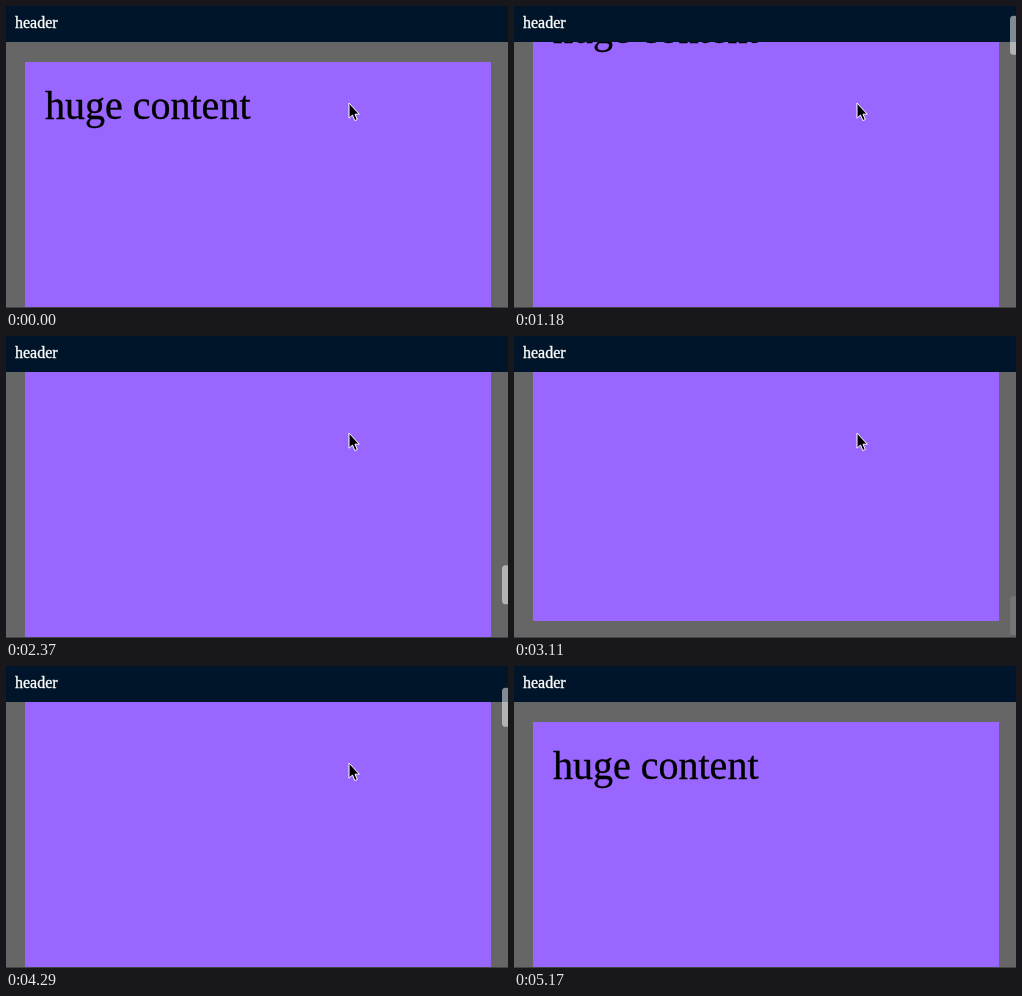
Write an HTML page that moves like this. It is 502 px wide and 302 px high and loops after 5320 ms.

```html
<!DOCTYPE html>
<html lang="en">
<head>
<meta charset="utf-8">
<title>Scrolling under a fixed header</title>
<style>
  html, body { margin: 0; width: 100%; height: 100%; overflow: hidden; background: #666; }
  svg { display: block; }
  text { font-family: "Liberation Serif", "Times New Roman", serif; stroke-width: 0.35; }
</style>
</head>
<body>
<svg width="502" height="302" viewBox="0 0 502 302">
  <rect width="502" height="302" fill="#666"/>
  <g id="page">
    <rect x="19" y="56" width="466" height="2269" fill="#96f"/>
    <text x="39" y="113" font-size="40" stroke="#000">huge content</text>
  </g>
  <rect width="502" height="36" fill="#001529"/>
  <text x="9" y="22" font-size="16" fill="#fff" stroke="#fff">header</text>
  <rect id="thumb" x="496" width="8" height="39" rx="3.5" fill="#fff"/>
  <rect y="301" width="502" height="1" fill="#444"/>
  <path id="cursor" d="M343 97V112.2L346.5 109L348.8 114.6L351.3 113.5L349 108.2H353.3Z"
        stroke="#fff" stroke-linejoin="round"/>
</svg>
<script>
const LOOP = 5320, START = 735, STEP = 147.8;   // ms
const END = 2040, THUMB_RATIO = 0.1275;
// Times below are counted in steps.
const UP_START = 17, UP_END = 25, CURSOR_GONE = 30;
const [page, thumb, cursor] = ["page", "thumb", "cursor"].map(id => document.getElementById(id));

function scrollAt(k) {
  if (k < 0 || k >= UP_END) return 0;
  // Down: nearly exponential growth until the page ends.
  if (k <= UP_START) return Math.min(END, 20 * Math.exp(k * (0.4585 - 0.0045 * k)));
  // Up: halfway between linear and smoothstep.
  const left = (UP_END - k) / (UP_END - UP_START);
  return END * left * (1 + 3 * left - 2 * left * left) / 2;
}

// The scrollbar stays from one step to another, then fades.
function barOpacity(k, from, fade) {
  if (k < from || k > fade) return 0;
  return k < fade ? 0.5 : 0.1;
}

function draw(now) {
  const k = Math.floor((now % LOOP - START) / STEP);
  const scroll = scrollAt(k);
  page.setAttribute("transform", `translate(0 ${-Math.round(scroll)})`);
  thumb.setAttribute("y", scroll * THUMB_RATIO);
  thumb.setAttribute("opacity", barOpacity(k, 0, 16) + barOpacity(k, UP_START + 1, 28));
  cursor.setAttribute("opacity", k < CURSOR_GONE ? 1 : 0);
}

const origin = performance.now();
function tick() {
  draw(performance.now() - origin);
  requestAnimationFrame(tick);
}
tick();
</script>
</body>
</html>
```
